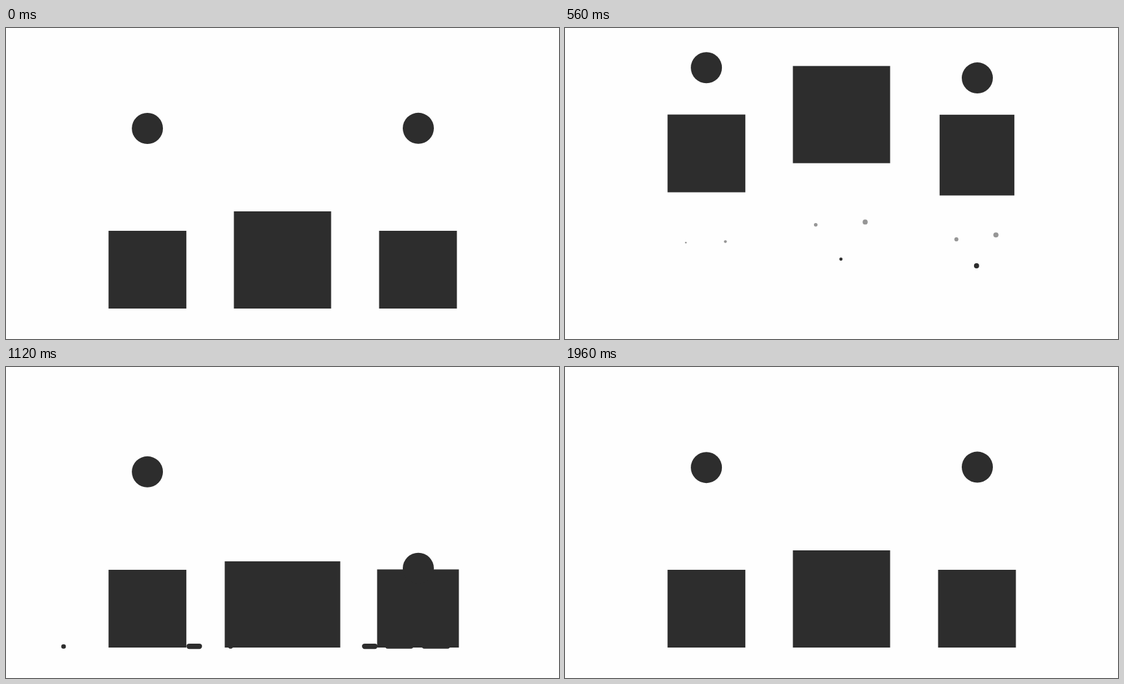
These frames come from a looping animation (853x480 px, 2 s). An HTML page with a canvas:

```html
<!DOCTYPE html>
<html>
<head>
<meta charset="utf-8">
<style>
  html, body { margin: 0; width: 100%; height: 100%; overflow: hidden; background: #fefefe; }
  canvas { display: block; }
</style>
</head>
<body>
<canvas id="stage" width="853" height="480"></canvas>
<script>
const ctx = document.getElementById('stage').getContext('2d');
const LOOP = 2000, GROUND = 433, DARK = '#2d2d2d', GREY = '#969696';

// x: body centre, head: head centre, k: size, delay in ms
const jumpers = [
  { x: 218.2, head: 218.1, k: 1, delay: 0 },
  { x: 426.5, k: 1.25, delay: 80 },
  { x: 635.5, head: 636, k: 1, delay: 160 }
];

const progress = (t, from, to) => Math.min(1, Math.max(0, (t - from) / (to - from)));
const smooth = u => u * u * (3 - 2 * u);
const easeOut = (u, n) => 1 - (1 - u) ** n;

// Cubic easing that starts flat: control points (x1, 0) and (x2, y2)
function easeIn(u, x1, x2, y2) {
  let lo = 0, hi = 1;
  for (let i = 0; i < 24; i++) {
    const s = (lo + hi) / 2, r = 1 - s;
    if (3 * r * r * s * x1 + 3 * r * s * s * x2 + s ** 3 < u) lo = s; else hi = s;
  }
  return 3 * (1 - lo) * lo * lo * y2 + lo ** 3;
}

// time, scale x, scale y
const squash = [
  [0, 1, 1], [80, 1.2, .8], [200, .8, 1.2], [480, 1, 1], [560, 1, 1],
  [912, .8, 1.2], [1003, 1.25, .85], [1120, 1, 1], [LOOP, 1, 1]
];

function scaleAt(t) {
  const i = squash.findIndex(key => key[0] > t);
  const a = squash[i - 1], b = squash[i];
  const u = smooth(progress(t, a[0], b[0]));
  return [a[1] + (b[1] - a[1]) * u, a[2] + (b[2] - a[2]) * u];
}

const liftAt = t => 180 * (1 - easeIn(Math.min(1, Math.abs(t - 520) / 440), .63, .785, .4));

function headAt(t) {
  if (t < 240) return 155;
  if (t < 620) return 155 - 94 * easeOut(progress(t, 240, 620), 3.2);
  if (t <= 960) return 61 + 252 * easeIn(progress(t, 620, 960), .84, .9, .4);
  const s = t - 1130;
  return 155 - 56.6 * Math.exp(-.00694 * s) * Math.sin(Math.PI * s / 250);
}

function dot(x, y, r, color) {
  if (r <= 0) return;
  ctx.fillStyle = color;
  ctx.beginPath();
  ctx.arc(x, y, r, 0, 2 * Math.PI);
  ctx.fill();
}

function greyPuff(x, t) {
  if (t >= 160) dot(x, -100 - 27.5 * 2 ** ((240 - t) / 80), Math.min(4, (680 - t) / 90), GREY);
}

function launchDust(t) {
  greyPuff(-31.8, t);
  greyPuff(29.2, t - 80);
  if (t >= 160) dot(-.7, -57 - 48.5 * 2.3 ** ((240 - t) / 80), Math.min(6.4, (560 - t) / 40), DARK);
}

function landingDust(t) {
  if (t < 940 || t >= 1140) return;
  const tail = 129 * easeOut(progress(t, 955, 1140), 2.5);
  const tip = 129 * easeOut(progress(t, 930, 1120), 2.5);
  ctx.strokeStyle = DARK;
  ctx.lineWidth = 6.6;
  ctx.lineCap = 'round';
  for (const side of [-1, 1]) {
    ctx.beginPath();
    ctx.moveTo(side * tail - .6, -1.6);
    ctx.lineTo(side * Math.max(tip, tail + .5) - .6, -1.6);
    ctx.stroke();
  }
}

function drawJumper({ x, head, k, delay }, now) {
  const t = (now - delay + LOOP) % LOOP;
  ctx.save();
  ctx.translate(x, GROUND);
  ctx.scale(k, k);
  launchDust(t);
  landingDust(t);
  const [sx, sy] = scaleAt(t);
  ctx.fillStyle = DARK;
  ctx.fillRect(-60 * sx, -liftAt(t) - 120 * sy, 120 * sx, 120 * sy);
  ctx.restore();
  if (head) dot(head, headAt(t), 24, DARK);
}

function frame() {
  const now = performance.now() % LOOP;
  ctx.fillStyle = '#fefefe';
  ctx.fillRect(0, 0, 853, 480);
  for (const j of jumpers) drawJumper(j, now);
  requestAnimationFrame(frame);
}
frame();
</script>
</body>
</html>
```
